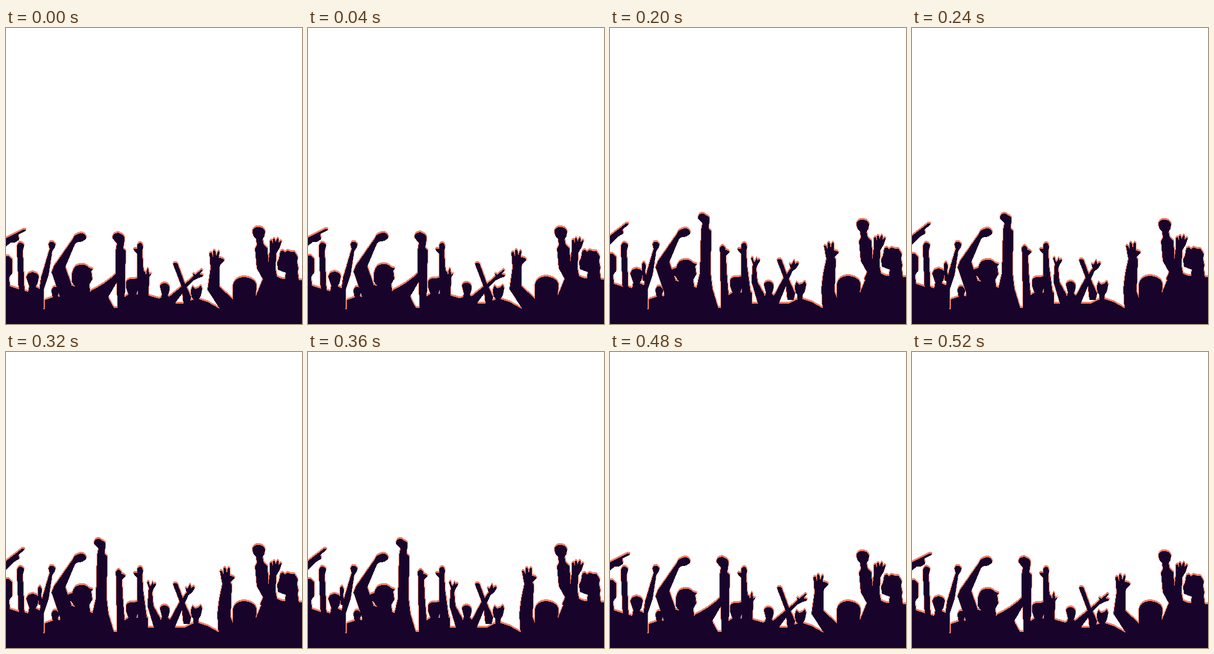
Animation, 480 px wide and 480 px high, one loop 560 ms. Source, as an HTML page:

```html
<!DOCTYPE html>
<html lang="en">
<head>
<meta charset="utf-8">
<title>Cheering crowd</title>
<style>
  html, body { margin: 0; width: 100%; height: 100%; overflow: hidden; background: #fff; }
  svg {
    --rim: #f18069;
    display: block; width: 100vw; height: 100vh;
    fill: #18042b; shape-rendering: crispEdges;
    filter: drop-shadow(-1px -1px 0 var(--rim)) drop-shadow(1px -2px 0 var(--rim));
  }
  .low, .high, .bob { animation: 560ms step-end infinite; }
  .low { animation-name: low; }
  .high { animation-name: high; }
  .bob { animation-name: bob; }
  @keyframes low {
    0%, 71.4286% { visibility: visible; }
    21.4286% { visibility: hidden; }
  }
  @keyframes high {
    0%, 71.4286% { visibility: hidden; }
    21.4286% { visibility: visible; }
  }
  @keyframes bob {
    0%, 21.4286%, 57.1429%, 85.7143% { transform: translateY(0); }
    7.1429%, 28.5714%, 71.4286% { transform: translateY(-1px); }
    35.7143% { transform: translateY(-2px); }
  }
</style>
</head>
<body>
<svg viewBox="0 0 480 480">
  <defs>
    <path id="edge" d="M-5 369L5 370 10 376V398L5 405 6 419 22 424V450H-5Z"/>
    <path id="bob-cut" d="M33 405Q34 397 43 396Q52 397 53 404L51 415 48 420 60 426V450H20L22 424 36 428 38 419Z"/>
    <path id="small" d="M74 428Q74 420 80 420Q86 421 86 428L84 435 92 438V460H63V441L76 437Z"/>
    <g id="cap">
      <path d="M107 412Q105 390 116 385Q128 381 134 389L141 391 138 394 140 408 135 416 136 428 166 436 172 455V490H88V437L106 418 112 419Z"/>
      <path d="M108 343Q110 335 121 333Q130 333 130 341Q126 347 117 347L112 350 96 388 106 416 104 430 88 437 74 396 78 386Z"/>
    </g>
    <path id="short" d="M195 412Q197 406 206 407L214 406 216 412 214 425 211 432H230V470H185L190 438 199 432Q194 424 195 412Z"/>
    <path id="round" d="M250 420Q250 414 258 414Q265 415 265 422Q265 430 262 434L268 440 274 450V470H246V440L252 437 253 432Z"/>
    <path id="cross" d="M271 383Q273 379 278 382L281 390 289 412 300 436 298 447H288L285 420 276 396Z"/>
    <path id="buns" d="M304 452V440L301 437 300 426 302 419 306 423 312 422 316 417 318 423 316 434 312 441V452Z"/>
    <path id="fist" d="M400 330Q400 323 409 323Q418 323 420 330L419 338 416 343 418 352 424 357 426 402V420H412L417 408 407 390 404 358 407 352 406 343Q400 338 400 330Z"/>
    <g id="curly">
      <path d="M428 345L431 344 433 350V342H436L437 348 440 341 442 342V349L446 344 447 347 443 358 438 366 437 392 440 405V420H418L424 390 427 368 428 362Z"/>
      <path d="M441 392L440 380 443 374 445 362 449 361 452 364 457 361 462 363 468 363 471 368 473 372 472 380 474 390 473 396 475 410H452L454 397Z"/>
      <path d="M404 438L418 404 438 403 448 407 480 409V490H400Z"/>
    </g>
    <path id="long" d="M368 438V418Q370 405 386 404Q402 405 406 416L405 438 410 445H368Z"/>
  </defs>

  <!-- ground mass and steady arms -->
  <path d="M0 435L60 440V456H66L74 446 100 436 166 438 175 454 228 452 230 447H290L302 441 314 440 328 445 346 455 368 442H480V490H0Z"/>
  <path d="M18 360Q17 350 22 348Q29 348 29 354L27 362 30 430H21Z"/>
  <path d="M71 358Q67 349 72 347Q79 346 80 352Q79 358 75 361L69 400 61 425V455H50L57 405Z"/>
  <path d="M213 352Q215 347 220 349Q223 353 221 362L222 385 230 445H214L213 366 208 362 207 358H213Z"/>

  <!-- arms lowered -->
  <g class="low">
    <use href="#small"/>
    <path d="M223 394L226 396 227 402 229 390 231 391 232 400 236 398 232 405 231 434 252 440V455H222V405Z"/>
    <path d="M262 438L300 407 304 402 303 398 307 400 317 392 319 394 313 399 320 401 319 403 311 406 305 409 296 417 275 445V452H262Z"/>
    <use href="#cross"/>
    <use href="#fist"/>
    <g class="bob">
      <path d="M-5 344L0 341 28 327H32V329L20 335 21 344 14 348 8 348 -5 358Z"/>
      <use href="#edge"/><use href="#bob-cut"/><use href="#cap"/>
      <use href="#short"/><use href="#round"/><use href="#buns"/>
      <path d="M173 341Q172 333 182 332L190 336Q194 341 191 350L190 358 194 362 193 405 192 455H181L180 412 166 436 160 445 130 440 138 426Q160 416 178 399V362L180 350Z"/>
      <path d="M330 365L333 364 336 372V361H339L341 370 344 362 346 363 345 373 352 374 354 377 348 383 346 388V420L368 440 370 460H350L327 425 332 390Z"/>
      <use href="#long"/><use href="#curly"/>
    </g>
  </g>

  <!-- arms raised -->
  <g class="high">
    <use href="#small" y="-1"/>
    <path d="M52 386Q51 381 55 380Q58 382 58 387L57 395 60 410H53Z"/>
    <path d="M178 360Q178 353 183 353Q188 355 187 360L192 361 194 364 188 369 189 395 192 432 190 455H180L179 366Z"/>
    <path d="M231 371L233 379 236 378 238 371 239 378 242 374 243 378 239 385 237 390 239 412 250 432 256 450H241L230 413 231 388 232 384 229 374Z"/>
    <path d="M264 438L280 408 293 390 291 382 294 384 299 376 300 383 305 380 306 383 302 390 296 394 288 412 274 446V452H264Z"/>
    <use href="#cross" y="-6"/>
    <use href="#round" y="-3"/><use href="#buns" y="-7"/>
    <g class="bob">
      <path d="M-5 343L0 339 26 319H30V321L20 329 22 335 14 340 -5 358Z"/>
      <use href="#edge" y="-2"/><use href="#bob-cut" y="-4"/><use href="#cap" y="-6"/>
      <path d="M107 391L101 393 99 398 103 404 108 405Z"/>
      <use href="#short" y="-1"/>
      <path d="M143 311Q142 303 151 303L160 308Q163 314 160 322V328L164 332 163 400 166 425 175 455H135L140 425 146 400 148 330 150 319Z"/>
      <path d="M347 355H350L353 361V350H356L358 359 360 350 363 351V363L368 364 371 366 364 374 366 378 364 430 368 440V460H345L343 425 346 400 351 377Z"/>
      <use href="#fist" y="-10"/>
      <use href="#long"/><use href="#curly" y="-3"/>
    </g>
  </g>
</svg>
</body>
</html>
```
